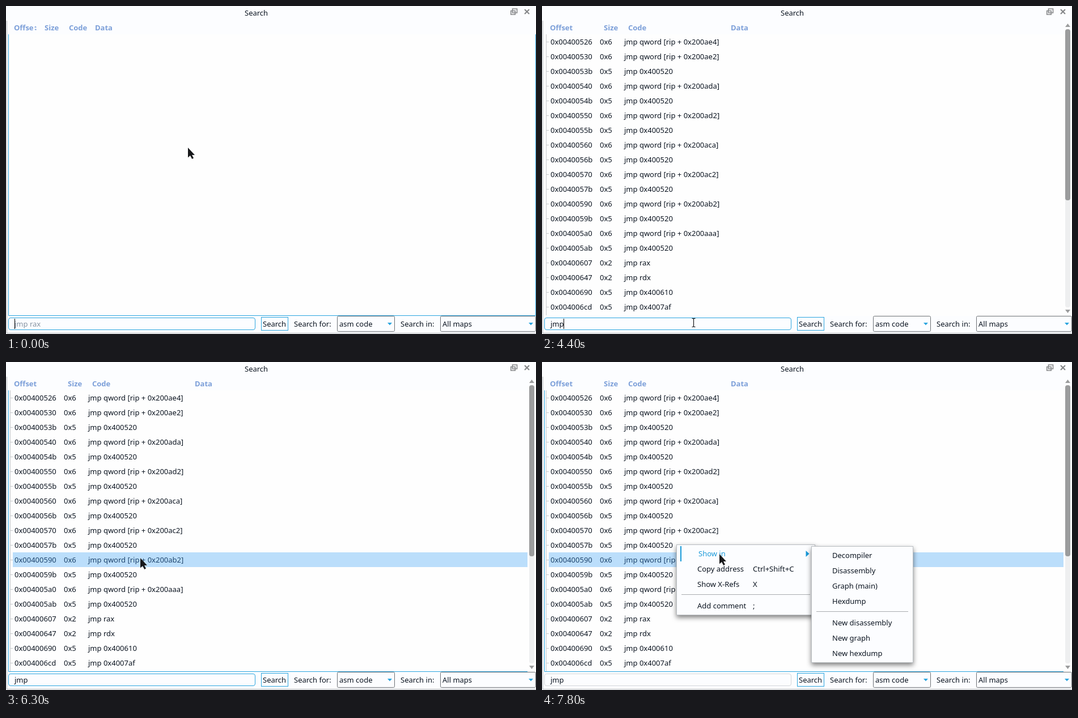
These frames come from a looping animation (935x579 px, 8 s). An HTML page:

```html
<!DOCTYPE html>
<html lang="en">
<head>
<meta charset="utf-8">
<title>Search</title>
<style>
  html, body { margin: 0; width: 100%; height: 100%; overflow: hidden; background: #fcfdff; }
  svg { display: block; width: 100vw; height: 100vh; }
  text { font: 13px "Noto Sans", sans-serif; fill: #0b1420; white-space: pre; }
  .head text { font-weight: bold; fill: #7c9fd9; }
  .picked text { fill: #1f456c; }
  .hot text { fill: #1a9ad9; }
  .menu { filter: drop-shadow(0 4px 4px rgba(0, 0, 0, .5)); }
</style>
</head>
<body>
<svg id="stage" viewBox="0 0 935 579"></svg>
<script>
const LOOP = 8000, STEP = 100;
const BLUE = '#2ba5df', INK = '#0b1420', PAPER = '#fcfdff';
const stage = document.getElementById('stage');

function add(parent, tag, attrs = {}, content) {
  const el = document.createElementNS('http://www.w3.org/2000/svg', tag);
  for (const k in attrs) el.setAttribute(k, attrs[k]);
  if (content !== undefined) el.textContent = content;
  parent.appendChild(el);
  return el;
}
const group = (cls, parent = stage) => add(parent, 'g', { class: cls });
const rect = (p, x, y, width, height, fill, more) => add(p, 'rect', { x, y, width, height, fill, ...more });
const label = (p, x, y, s) => add(p, 'text', { x, y }, s);
const path = (p, d, fill, more) => add(p, 'path', { d, fill, ...more });
const frame = (p, x, y, w, h, stroke, rx = 0, fill = PAPER) =>
  rect(p, x + .5, y + .5, w - 1, h - 1, fill, { stroke, rx });
const show = (el, on) => el.setAttribute('display', on ? 'inline' : 'none');

// Window
rect(stage, 0, 0, 935, 579, PAPER);
rect(stage, 4, 50, 931, 497, '#fefefe');
rect(stage, 1, 26, 1, 552, '#b4b7ba');
rect(stage, 1, 577, 934, 1, '#b4b7ba');
label(stage, 421, 17, 'Search');
path(stage, 'M893.5 5h8v7h-8zM890.7 8.5h7.5v6.5h-7.5z', 'none', { stroke: '#858789', 'stroke-width': 1.6 });
path(stage, 'M915 6l8 8M923 6l-8 8', 'none', { stroke: '#858789', 'stroke-width': 2.2 });

function header(names, xs) {
  const g = group('head');
  names.forEach((s, i) => label(g, xs[i], 43, s));
  return g;
}
const emptyHead = header(['Offse', 'Size', 'Code', 'Data'], [14, 68, 111, 157]);
path(emptyHead, 'M50 38l2-2.5 2 2.5zM50.5 40.5h3v2h-2z', '#7c9fd9');
const fullHead = header(['Offset', 'Size', 'Code', 'Data'], [14, 109, 152, 333]);

// Results
const found = `526 ae4,530 ae2,53b,540 ada,54b,550 ad2,55b,560 aca,56b,570 ac2,57b,590 ab2,59b,5a0 aaa,5ab,
607 rax,647 rdx,690 0x400610,6cd 0x4007af`.split(',').map(s => {
  const [at, to] = s.trim().split(' ');
  if (!to) return [at, 5, '0x400520'];
  if (to.startsWith('a')) return [at, 6, `qword [rip + 0x200${to}]`];
  return [at, to.startsWith('r') ? 2 : 5, to];
});
const results = group('results');
rect(results, 7, 50, 1, 496, '#c6c9cc');
const rows = found.map(([at, size, to], i) => {
  const g = group('', results), y = 50 + 26 * i;
  const bar = rect(g, 12, y, 908, 26, '#bbdefb');
  rect(g, 8, y + 13, 4, 1, '#c6c9cc');
  label(g, 15, y + 18, '0x00400' + at);
  label(g, 102, y + 18, '0x' + size);
  label(g, 145, y + 18, 'jmp ' + to);
  return { g, bar };
});
rect(results, 923, 41, 9, 491, '#eeeff0', { rx: 4 });
rect(results, 923, 41, 9, 302, '#9b9c9d', { rx: 4 });
path(results, 'M923 37l4.5-6 4.5 6zM923 536h9l-4.5 6z', '#9b9c9d');

const emptyEdge = path(stage, 'M4.5 50V546.5H934.5V50', 'none', { stroke: BLUE });
const fullEdge = path(stage, 'M4.5 50V546.5H920', 'none', { stroke: BLUE });

// Search bar
const field = frame(stage, 4, 550, 436, 22, BLUE, 3.5);
const hint = label(stage, 15, 566, 'jmp rax');
hint.style.fill = '#8794a3';
const typed = label(stage, 15, 566, '');
const caret = rect(stage, 15, 552, 1, 18, '#000');
frame(stage, 450, 549, 48, 24, BLUE);
label(stage, 453, 566, 'Search');
label(stage, 508, 566, 'Search for:');
label(stage, 696, 566, 'Search in:');
function combo(x, w, s) {
  frame(stage, x, 547, w, 28, '#6d7175', 2);
  label(stage, x + 4, 566, s);
  path(stage, `M${x + w - 13} 559h8l-4 4.5z`, BLUE);
}
combo(584, 102, 'asm code');
combo(766, 169, 'All maps');

// Menus
function menu(x, y, w, h, lines, rule) {
  const g = group('menu');
  frame(g, x, y, w, h, '#b9bdc1');
  rect(g, x + 9, rule, w - 18, 1, '#a9acaf');
  lines.forEach(([dy, s, key]) => {
    label(g, x + 37, y + dy, s);
    if (key) label(g, x + 135, y + dy, key);
  });
  return g;
}
const mainMenu = menu(237, 322, 245, 125,
  [[48, 'Copy address', 'Ctrl+Shift+C'], [75, 'Show X-Refs', 'X'], [113, 'Add comment', ';']], 410);
const showIn = group('', mainMenu);
const hotBar = rect(showIn, 244, 325, 2, 27, '#1a9ad9');
const showText = label(showIn, 274, 343, 'Show in');
const showArrow = path(showIn, 'M465.5 333v11l6-5.5z', INK);
const subMenu = menu(475, 325, 180, 206,
  [[21, 'Decompiler'], [48, 'Disassembly'], [75, 'Graph (main)'], [102, 'Hexdump'],
   [140, 'New disassembly'], [167, 'New graph'], [194, 'New hexdump']], 440);

// Pointer
const pointer = group('pointer');
const arrow = path(pointer, 'M0 0V17.5L4 14 7.2 20 10 18.6 7 13H12z', '#17181a',
  { stroke: '#fff', 'stroke-width': .8, 'stroke-opacity': .7, 'paint-order': 'stroke' });
const beam = path(pointer, 'M-2.5-7.5H-.5L.5-6.5 1.5-7.5H3.5M.5-6.5V6.5M-2.5 7.5H-.5L.5 6.5 1.5 7.5H3.5', 'none',
  { stroke: '#17181a', 'stroke-width': 1.2 });

const smooth = p => p * p * (3 - 2 * p);
const brake = p => 1 - (1 - p) ** 2.25;
// start, steps, from, to, easing in x and y
const moves = [
  [400, 8, [321, 250], [267, 558], smooth, smooth],
  [1300, 1, [267, 558], [267, 559], smooth, smooth],
  [5600, 8, [267, 559], [237, 346], p => Math.min(1, 2 * p), brake],
  [7500, 4, [237, 346], [313, 339], smooth, smooth]
];
function pointerAt(t) {
  let pos = moves[0][2];
  for (const [start, n, a, b, ex, ey] of moves) {
    if (t < start) break;
    const p = Math.min(1, ((t - start) / STEP + 1) / n);
    pos = [a[0] + (b[0] - a[0]) * ex(p), a[1] + (b[1] - a[1]) * ey(p)].map(Math.round);
  }
  return pos;
}

const keys = [2400, 2700, 2900];
const caretX = [15, 18, 30, 38];
const caretOn = [[0, 400], [1000, 1600], [2200, 3600], [4400, 5000], [5600, 6200]];

function render(t) {
  t = Math.floor(t / STEP) * STEP;
  const [x, y] = pointerAt(t);
  const inTable = y < 547, full = t >= 4400, blurred = t >= 6800, hot = t >= 7500;

  pointer.setAttribute('transform', `translate(${x} ${y})`);
  show(arrow, inTable);
  show(beam, !inTable);

  show(emptyHead, !full);
  show(fullHead, full);
  show(results, full);
  show(emptyEdge, inTable && !full);
  show(fullEdge, inTable && full);

  const hit = !full || !inTable ? -1 : t >= 6300 ? 11 : Math.floor((y - 50) / 26);
  rows.forEach(({ g, bar }, i) => {
    show(bar, i === hit);
    g.setAttribute('class', i === hit ? 'picked' : '');
  });

  const n = keys.filter(k => t >= k).length;
  typed.textContent = 'jmp'.slice(0, n);
  show(hint, n === 0);
  caret.setAttribute('x', caretX[n]);
  show(caret, caretOn.some(([a, b]) => t >= a && t < b));
  field.setAttribute('stroke', blurred ? '#d3d6d9' : BLUE);

  show(mainMenu, t >= 7000);
  show(subMenu, t >= 7800);
  show(hotBar, hot);
  showIn.setAttribute('class', hot ? 'hot' : '');
  showText.setAttribute('x', hot ? 276 : 274);
  showArrow.setAttribute('fill', hot ? '#1a9ad9' : INK);
}

const born = performance.now();
function tick() {
  render((performance.now() - born) % LOOP);
  requestAnimationFrame(tick);
}
tick();
</script>
</body>
</html>
```
